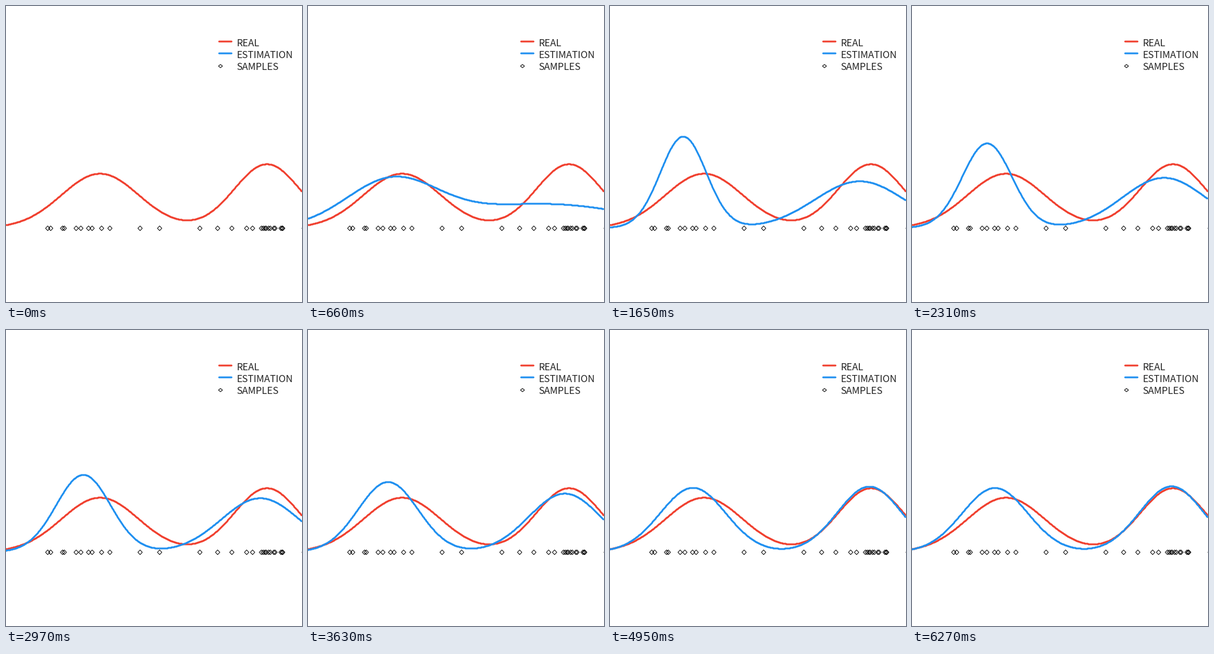
These frames come from a looping animation (500x500 px, 7.92 s). A matplotlib script:

```python
import numpy as np
import matplotlib.pyplot as plt
from matplotlib.animation import FuncAnimation
from matplotlib.patches import Polygon

SIZE, DPI = 500, 100
PX = 72 / DPI
FRAMES, STEP_MS = 24, 330
LAST_STEP = 18
BASE_Y, SCALE = 375, 30000
RED, BLUE, INK = "#f03e2d", "#1e8ff0", "#222222"

# The last two samples lie beyond the right edge.
SAMPLES = np.array([
    70, 75, 95, 98, 118, 126, 139, 145, 161, 175, 226, 259, 327, 357, 381,
    406, 416, 431, 434, 437, 439, 443, 446, 452, 454, 464, 466, 467, 503, 580,
], float)


def bell(x, mean, sd):
    z = (np.asarray(x)[:, None] - mean) / sd
    return np.exp(-z * z / 2) / (sd * np.sqrt(2 * np.pi))


def curve(mean, sd):
    """Screen height of an evenly weighted pair of bells, in whole pixels."""
    return np.round(BASE_Y - SCALE * bell(xs, mean, sd).mean(axis=1))


def em_steps(count):
    """Fit two bells to the samples; the spread is taken about the old means."""
    mean, sd = np.array([133.0, 300.0]), np.array([99.0, 101.0])
    weight = np.array([0.47, 0.53])
    steps = [(mean, sd)]
    for _ in range(count):
        share = weight * bell(SAMPLES, mean, sd)
        share /= share.sum(axis=1, keepdims=True)
        total = share.sum(axis=0)
        spread = (share * (SAMPLES[:, None] - mean) ** 2).sum(axis=0)
        sd = np.sqrt(spread / total)
        mean = share.T @ SAMPLES / total
        weight = total / len(SAMPLES)
        steps.append((mean, sd))
    return steps


def diamond(x, y, w, h):
    corners = [(x - w, y), (x, y - h), (x + w, y), (x, y + h)]
    ax.add_patch(Polygon(corners, fill=False, ec="black", lw=PX, zorder=4))


def key(y, color):
    ax.plot([360, 381], [y, y], color=color, snap=False, **thick)


def label(y, text):
    ax.text(389, y, text, family="Noto Sans CJK JP", fontsize=16.3 * PX,
            color=INK, va="baseline")


fig = plt.figure(figsize=(SIZE / DPI, SIZE / DPI), dpi=DPI, facecolor="white")
ax = fig.add_axes([0, 0, 1, 1])
ax.set_xlim(0, SIZE)
ax.set_ylim(SIZE, 0)
ax.axis("off")

xs = np.arange(0, SIZE)
fits = [curve(*step) for step in em_steps(LAST_STEP)]
thick = dict(lw=3 * PX, solid_capstyle="round")

ax.plot(xs, curve(np.array([159, 441]), np.array([65.3, 55.6])),
        color=RED, zorder=2, **thick)
estimate, = ax.plot([], [], color=BLUE, zorder=3, **thick)

for s in SAMPLES:
    diamond(s + 0.5, BASE_Y + 0.5, 3.7, 4)

key(60, RED)
key(80, BLUE)
diamond(362.3, 101.5, 3.4, 2.8)
label(68, "REAL")
label(88, "ESTIMATION")
label(108, "SAMPLES")


def draw(frame):
    if frame == 0:
        estimate.set_data([], [])
    else:
        estimate.set_data(xs, fits[min(frame - 1, LAST_STEP)])
    return estimate,


anim = FuncAnimation(fig, draw, frames=FRAMES, interval=STEP_MS,
                     repeat=True, repeat_delay=0)
plt.show()
```
